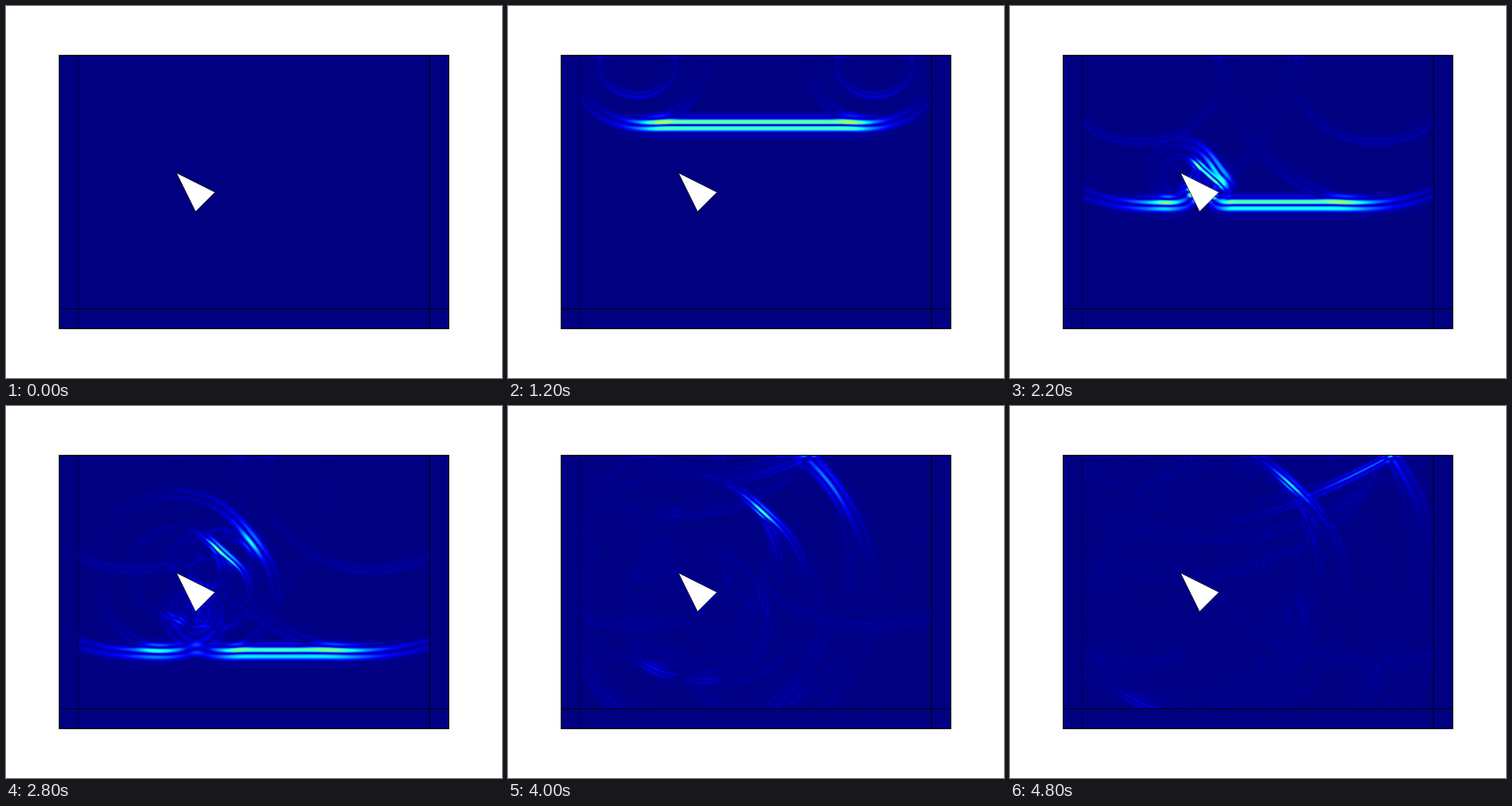
Write an HTML page with a canvas that moves like this. It is 640 px wide and 480 px high and loops after 5000 ms.

```html
<!DOCTYPE html>
<html lang="en">
<head>
<meta charset="utf-8">
<title>Elastic wave scattering at a triangular void</title>
<style>
  html, body { margin: 0; width: 100%; height: 100%; overflow: hidden; background: #fff; }
  canvas, svg { position: absolute; left: 0; top: 0; display: block; }
</style>
</head>
<body>
<canvas id="field" width="640" height="480"></canvas>
<svg width="640" height="480" viewBox="0 0 640 480" fill="none" stroke="#000">
  <path d="M93.5 64V416" opacity=".45"/>
  <path d="M546.5 64V416M68 390.5H572"/>
  <rect x="68.5" y="63.5" width="503" height="353"/>
  <path d="M219.8 215.2L269.8 240.3L244.6 265.4Z" fill="#fff" stroke-width=".8"/>
</svg>
<script>
const LOOP = 5000, HOLD = 200, FRAMES = LOOP / HOLD;
const STEPS = 32, DT = HOLD / STEPS;          // solver steps per picture
const X0 = 93, Y0 = 64, VW = 454, VH = 327;   // visible part of the medium
const PAD = 40;                               // hidden absorbing border
const W = VW + 2 * PAD, H = VH + PAD + 1, N = W * H;

// Pressure and shear speeds in px per ms, and the pulse
const CP = 0.1037, SHEAR = 0.59;
const PULSE_AT = 328, PULSE_WIDTH = 61, PULSE_OMEGA = 0.315 * CP;
const GAIN = 0.67, DECAY = 10000;

const C = CP * DT;
const L2M = C * C, MU = L2M * SHEAR * SHEAR, LAM = L2M - 2 * MU;

const grid = () => new Float32Array(N);
const vx = grid(), vy = grid(), sxx = grid(), syy = grid(), sxy = grid();
const solid = grid(), shear = grid(), bx = grid(), by = grid(), damp = grid();

const TRI = [[219.8, 215.2], [269.8, 240.3], [244.6, 265.4]];
function inTriangle(x, y) {
  return TRI.every(([ax, ay], n) => {
    const [cx, cy] = TRI[(n + 1) % 3];
    return (cx - ax) * (y - ay) - (cy - ay) * (x - ax) >= 0;
  });
}

function buildMedium() {
  for (let j = 0; j < H; j++) for (let i = 0; i < W; i++) {
    const k = j * W + i;
    const x = X0 - PAD + i + 0.5, y = Y0 + j - 0.5;
    solid[k] = j > 0 && !inTriangle(x, y) ? 1 : 0;
    const dx = Math.max(0, PAD - i, i - (W - 1 - PAD));
    const dy = Math.max(0, j - VH);
    damp[k] = Math.exp(-(0.011 ** 2) * (dx * dx + dy * dy));
  }
  const buoyancy = sum => sum ? 2 / sum : 0;
  for (let j = 1; j < H; j++) for (let i = 1; i < W; i++) {
    const k = j * W + i;
    bx[k] = buoyancy(solid[k] + solid[k - 1]);
    by[k] = buoyancy(solid[k] + solid[k - W]);
    shear[k] = MU * solid[k] * solid[k - 1] * solid[k - W] * solid[k - W - 1];
  }
}

// Load on the free top edge, with soft ends
const soft = d => 1 / (1 + Math.exp(-d / 1.8));
const load = Float32Array.from({ length: W }, (_, i) => {
  const x = X0 - PAD + i + 0.5;
  return soft(x - 167) * soft(473 - x);
});

function pulse(t) {
  const s = t - PULSE_AT;
  return Math.sin(PULSE_OMEGA * s) * Math.exp(-s * s / (2 * PULSE_WIDTH ** 2));
}

let step = 0;
function advance() {
  const rows = Math.min(H - 1, step + 4);
  for (let j = 1; j < rows; j++) {
    for (let k = j * W + 1, end = j * W + W - 1; k < end; k++) {
      const d = damp[k];
      vx[k] = d * (vx[k] + bx[k] * (sxx[k] - sxx[k - 1] + sxy[k + W] - sxy[k]));
      vy[k] = d * (vy[k] + by[k] * (sxy[k + 1] - sxy[k] + syy[k] - syy[k - W]));
    }
  }
  const force = 2 * C * pulse(step * DT);
  for (let i = 1; i < W - 1; i++) vy[W + i] += force * load[i];

  for (let j = 1; j < rows; j++) {
    for (let k = j * W + 1, end = j * W + W - 1; k < end; k++) {
      const d = damp[k], m = d * solid[k];
      const ex = vx[k + 1] - vx[k], ey = vy[k + W] - vy[k];
      sxx[k] = d * sxx[k] + m * (L2M * ex + LAM * ey);
      syy[k] = d * syy[k] + m * (LAM * ex + L2M * ey);
      sxy[k] = d * (sxy[k] + shear[k] * (vx[k] - vx[k - W] + vy[k] - vy[k - 1]));
    }
  }
  step++;
  if (step % STEPS === 0) shots.push(capture());
}

// Speed of the medium at each visible pixel, as a colour level
function capture() {
  const out = new Uint8ClampedArray(VW * VH);
  const late = Math.max(0, step * DT - 800);
  const scale = 255 * GAIN * Math.exp(-late / DECAY) / 2;
  for (let y = 0, n = 0; y < VH; y++) {
    for (let x = 0, k = (y + 1) * W + PAD; x < VW; x++, k++) {
      const u = vx[k] + vx[k + 1], v = vy[k] + vy[k + W];
      out[n++] = scale * Math.sqrt(u * u + v * v);
    }
  }
  return out;
}

const ramp = (v, mid) => Math.round(255 * Math.min(1, Math.max(0, 1.5 - Math.abs(4 * v - mid))));
const palette = Uint32Array.from({ length: 256 }, (_, n) => {
  const v = n / 255;
  return (255 << 24 | ramp(v, 1) << 16 | ramp(v, 2) << 8 | ramp(v, 3)) >>> 0;
});

const ctx = document.getElementById('field').getContext('2d');
ctx.fillStyle = '#000080';
ctx.fillRect(68, 63, 504, 354);
const image = ctx.createImageData(VW, VH);
const pixels = new Uint32Array(image.data.buffer);

buildMedium();
const shots = [capture()];
let shown = -1;

function draw() {
  const index = Math.floor(performance.now() % LOOP / HOLD);
  while (shots.length <= index) advance();
  if (index !== shown) {
    const shot = shots[index];
    for (let n = 0; n < shot.length; n++) pixels[n] = palette[shot[n]];
    ctx.putImageData(image, X0, Y0);
    shown = index;
  }
  // work ahead a little so that picture changes stay on time
  for (let n = 0; n < 4 && shots.length < FRAMES; n++) advance();
  requestAnimationFrame(draw);
}
draw();
</script>
</body>
</html>
```
